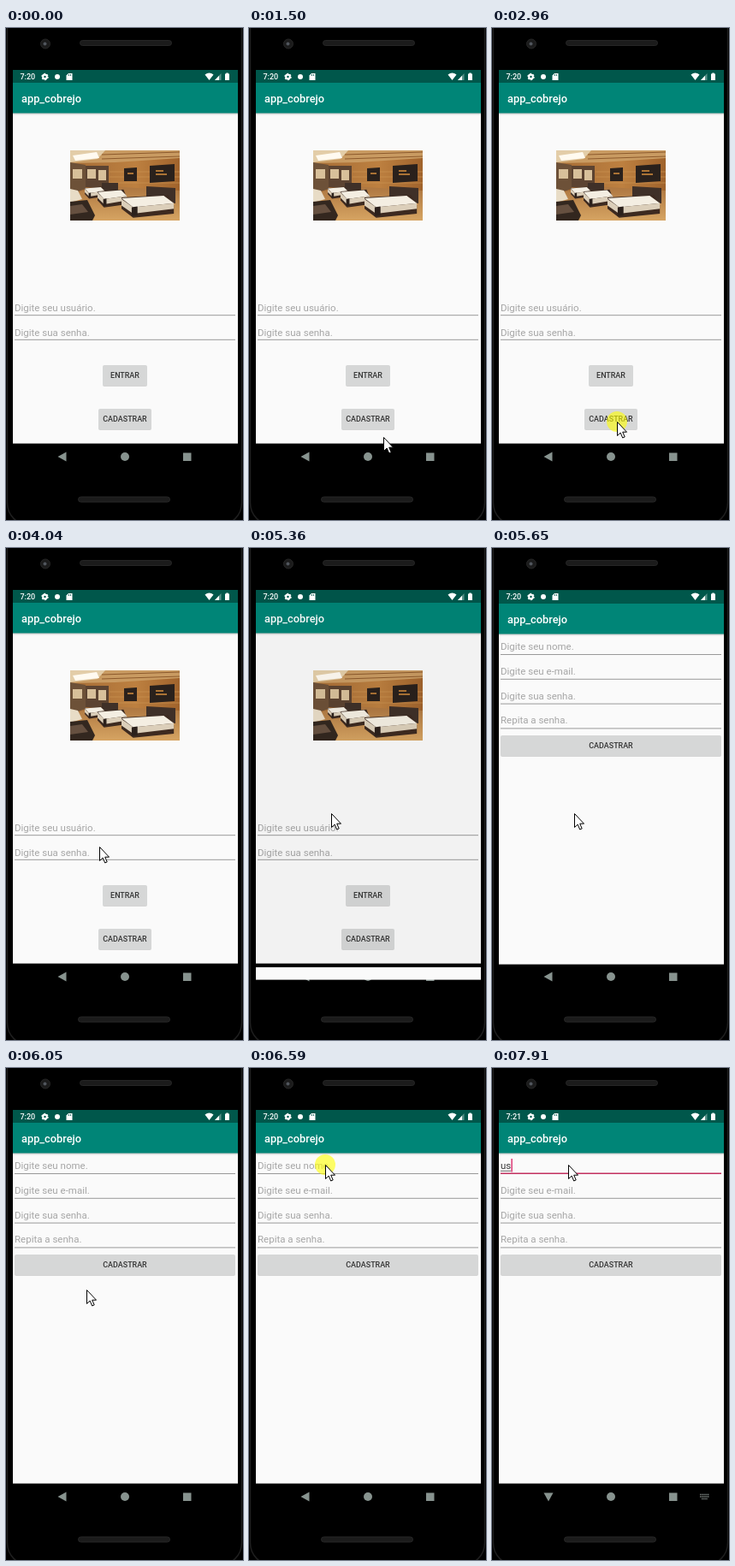
An HTML page that plays this animation: 277 px wide and 575 px high, repeating every 8000 ms.

```html
<!DOCTYPE html>
<html lang="pt">
<head>
<meta charset="utf-8">
<style>
  html, body { margin: 0; width: 100%; height: 100%; overflow: hidden; background: #000; }
  svg { display: block; width: 277px; height: 575px; font-family: Roboto, sans-serif; }
  .title { font-size: 12.8px; font-weight: 500; fill: #fff; }
  .hint { font-size: 11.5px; fill: #a6a6a6; }
  .line { stroke: #999; stroke-width: 1; }
  .label { font-size: 8.95px; font-weight: 500; fill: #333; text-anchor: middle; }
</style>
</head>
<body>
<svg viewBox="0 0 277 575">
  <defs>
    <clipPath id="screenClip"><rect x="8" y="49" width="263" height="467"/></clipPath>
    <clipPath id="revealClip"><rect id="reveal" x="8" y="49" width="263" height="490"/></clipPath>
    <clipPath id="photoClip"><rect x="75" y="143" width="128" height="82"/></clipPath>
    <linearGradient id="shade" x2="0" y2="1">
      <stop stop-color="#000" stop-opacity=".25"/><stop offset="1" stop-color="#000" stop-opacity="0"/>
    </linearGradient>
    <linearGradient id="wall">
      <stop stop-color="#a56c36"/><stop offset=".6" stop-color="#bd8040"/><stop offset="1" stop-color="#a0632c"/>
    </linearGradient>
    <linearGradient id="floor" x2="0" y2="1">
      <stop stop-color="#ad7640"/><stop offset="1" stop-color="#d6a462"/>
    </linearGradient>
    <g id="window">
      <rect x="8" y="49" width="263" height="436.600" fill="#fafafa"/>
      <rect x="8" y="99" width="263" height="3" fill="url(#shade)"/>
      <rect x="8" y="49" width="263" height="15" fill="#00574b"/>
      <rect x="8" y="64" width="263" height="35.500" fill="#008577"/>
      <text class="title" x="18" y="87">app_cobrejo</text>
    </g>
    <g id="bed">
      <path d="M0 0 32 -3 36 10V20L8 25 0 14Z" fill="#3d2a20"/>
      <path d="M0 1 29 -2 36 7 8 12Z" fill="#f4eee2"/>
      <path d="M0 2 8 12 36 7V14L8 20 0 10Z" fill="#dccfba"/>
      <path d="M7 12 11 11V22L7 23Z" fill="#2c211c"/>
    </g>
  </defs>

  <!-- phone body -->
  <rect width="277" height="575"/>
  <rect x="1.500" y="-30" width="274" height="611" rx="26" fill="none" stroke="#1f1f1f" stroke-width="1.500"/>
  <g fill="#1b1b1b" stroke="#262626">
    <rect x="86.500" y="14.500" width="107" height="6" rx="3"/>
    <rect x="84.500" y="548" width="107" height="6" rx="3"/>
    <circle cx="46" cy="18.500" r="5.500"/>
  </g>
  <circle cx="45.500" cy="18.500" r="2" fill="#50555c"/>

  <!-- navigation bar -->
  <g fill="#87938f">
    <path id="back" d="M60.500 501 70.500 495.500V506.500Z"/>
    <circle cx="139" cy="501" r="5"/>
    <rect x="207" y="496.500" width="9.500" height="9.500"/>
    <path id="keyboard" d="M243 498.500H254M243 501H254M245 503.500H252" stroke="#777f7c" stroke-width="1.500" stroke-dasharray="1.500 .6"/>
  </g>

  <g clip-path="url(#screenClip)"><g id="login">
    <use href="#window"/>
    <g clip-path="url(#photoClip)">
      <rect x="75" y="143" width="128" height="82" fill="url(#wall)"/>
      <path d="M75 143H203V152L128 157 75 158Z" fill="#c99b62"/>
      <path d="M75 143H116L107 153 75 157Z" fill="#e3cda8"/>
      <path d="M78 149 106 145 109 152 81 155Z" fill="#fffaf0"/>
      <path d="M112 148 203 145M112 153 203 150" stroke="#8d5a2c"/>
      <path d="M75 157 93 160V188L75 194Z" fill="#6d5138"/>
      <path d="M93 161H120V186H93Z" fill="#5c4331"/>
      <path d="M78 165H89V176H78ZM95 165H105V176H95ZM108 166H117V178H108Z" fill="#d8c09a"/>
      <path d="M121 168H203M121 174H203M121 181H203" stroke="#cb9351" stroke-width=".7"/>
      <path d="M138 164 153 163V179H138ZM168 161 197 159V179L168 181Z" fill="#2a211c"/>
      <path d="M142 170H149M175 167H184M175 171H188" stroke="#d68f3e" stroke-width="1.500"/>
      <path d="M75 193 119 185 203 190V225H75Z" fill="url(#floor)"/>
      <path d="M112 181H131V191H112ZM164 185 198 187V205L164 200Z" fill="#3f3028"/>
      <use href="#bed" transform="translate(92 187) scale(.65 .5)"/>
      <use href="#bed" transform="translate(107 191) scale(.95 .75)"/>
      <use href="#bed" transform="translate(135 198) scale(1.7 .95)"/>
      <path d="M75 188 84 190 89 200 75 204Z" fill="#e8dcc6"/>
      <path d="M75 203 95 201 104 219 101 225H75Z" fill="#33271f"/>
      <path d="M75 208 89 206 96 215 75 218Z" fill="#665040"/>
    </g>
    <g id="loginForm"></g>
    <rect id="ripple" x="108" y="445" width="62" height="24" rx="2" opacity="0"/>
    <rect id="scrim" x="8" y="49" width="263" height="437" opacity="0"/>
  </g></g>

  <g id="signupLayer" clip-path="url(#revealClip)"><g id="signup">
    <use href="#window"/>
    <g id="signupForm"></g>
    <g id="focus">
      <path d="M10 123.300H268" stroke="#c2305f" stroke-width="1.400"/>
      <text id="typed" x="10" y="118" font-size="11.500" fill="#3a3a3a"></text>
      <path id="composing" stroke="#444" stroke-width=".8"/>
      <rect id="caret" y="106" width="1.300" height="15.500" fill="#d81b60"/>
    </g>
  </g></g>

  <!-- status bar -->
  <g fill="#fff">
    <text id="clock" x="16.500" y="60.300" font-size="9" font-weight="500"></text>
    <circle cx="45.500" cy="57" r="2.300" fill="none" stroke="#fff" stroke-width="2.200"/>
    <circle cx="45.500" cy="57" r="3.600" fill="none" stroke="#fff" stroke-width="1.200" stroke-dasharray="2 1.770"/>
    <circle cx="60" cy="57" r="3"/>
    <path d="M73 53H77.500V61H70.500V55.500Z"/>
    <path d="M73.500 54V56M75.500 54V56" stroke="#00574b" stroke-width=".8"/>
    <path d="M232.500 54.500Q237.500 50.500 242.500 54.500L237.500 61Z"/>
    <path d="M244 61 251.500 53V61Z" opacity=".35"/>
    <path d="M244 61 249 55.700V61Z"/>
    <path d="M257.300 52.500H259.700V53.500H261V61H256V53.500H257.300Z"/>
  </g>

  <circle id="halo" r="12" fill="#ff0" opacity=".6"/>
  <path id="pointer" d="M.5 .5V16.500L4.200 13.100 6.700 19 9.200 17.900 6.700 12.200H11.500Z" fill="#fff" stroke="#000"/>
</svg>
<script>
const el = id => document.getElementById(id);
const show = (id, on) => el(id).setAttribute('visibility', on ? 'visible' : 'hidden');
const place = (id, x, y) => el(id).setAttribute('transform', `translate(${x} ${y})`);

const field = (hint, baseline, lineY, id = '') =>
  `<text ${id} class="hint" x="10" y="${baseline}">${hint}</text><path class="line" d="M10 ${lineY}H268"/>`;
const button = (label, x, y, w) =>
  `<rect x="${x}" y="${y + 1}" width="${w}" height="24" rx="2" fill="#bbb" opacity=".6"/>
   <rect x="${x}" y="${y}" width="${w}" height="24" rx="2" fill="#d6d7d7"/>
   <text class="label" x="${x + w / 2}" y="${y + 15.2}">${label}</text>`;

el('loginForm').innerHTML =
  field('Digite seu usuário.', 330.7, 335.7) + field('Digite sua senha.', 359.5, 364.3) +
  button('ENTRAR', 113, 394, 52) + button('CADASTRAR', 108, 445, 62);
el('signupForm').innerHTML =
  ['Digite seu nome.', 'Digite seu e-mail.', 'Digite sua senha.', 'Repita a senha.']
    .map((hint, i) => field(hint, 118 + 28.8 * i, 123.5 + 28.8 * i, i ? '' : 'id="nameHint"')).join('') +
  button('CADASTRAR', 10, 218, 258);

const moves = [
  [340, 490, 3, 204, 487], [660, 890, 4, 169, 475], [1500, 1500, 1, 157, 478],
  [1580, 1580, 1, 155, 478], [1730, 1810, 2, 156, 461], [2190, 2270, 2, 152, 461],
  [2420, 2500, 2, 146, 460], [3730, 4120, 6, 96, 310], [5890, 6510, 9, 89, 113]
];
const stepAt = (t, start, end, n) =>
  t < start ? 0 : t >= end ? n : Math.floor((t - start) / (end - start) * (n - 1) + 1e-6) + 1;
const smooth = u => u * u * (3 - 2 * u);

function pointerAt(t) {
  let x = 242, y = 549;
  for (const [start, end, n, toX, toY] of moves) {
    const u = smooth(stepAt(t, start, end, n) / n);
    x += (toX - x) * u;
    y += (toY - y) * u;
  }
  return [Math.round(x), Math.round(y)];
}

function render(t) {
  const [x, y] = pointerAt(t);
  place('pointer', x, y);
  show('pointer', t >= 340);
  place('halo', x, y);
  show('halo', t >= 2960 && t < 3120 || t >= 6590 && t < 6660);
  el('ripple').setAttribute('opacity', t < 3040 || t >= 3360 ? 0 : t < 3200 ? .12 : .06);

  // The new screen is uncovered from its bottom edge while it settles upwards.
  const step = stepAt(t, 5360, 5740, 6);
  const shift = step < 6 ? Math.round(19 * .38 ** Math.max(0, step - 1)) || 1 : 0;
  const revealTop = 516 - [0, 26, 360, 430, 467, 467, 467][step];
  place('login', 0, step > 1 ? -9 : 0);
  el('scrim').setAttribute('opacity', Math.min(.1, step * .032));
  show('signupLayer', step > 0);
  place('signup', 0, shift);
  el('reveal').setAttribute('y', revealTop);

  const text = t < 7840 ? '' : t < 7910 ? 'u' : 'us';
  el('focus').style.display = t >= 6660 ? '' : 'none';
  show('nameHint', !text && step > 0);
  el('typed').textContent = text;
  const width = text ? el('typed').getComputedTextLength() : 0;
  el('composing').setAttribute('d', `M10 120.300h${width}`);
  el('caret').setAttribute('x', 10.2 + width);
  el('caret').style.opacity = t >= 7210 && t < 7670 ? 0 : 1;

  el('clock').textContent = t < 7670 ? '7:20' : '7:21';
  el('back').setAttribute('transform', text ? 'rotate(-90 66 501)' : '');
  show('keyboard', text);
}

function tick() {
  render(performance.now() % 8000);
  requestAnimationFrame(tick);
}
tick();
</script>
</body>
</html>
```
